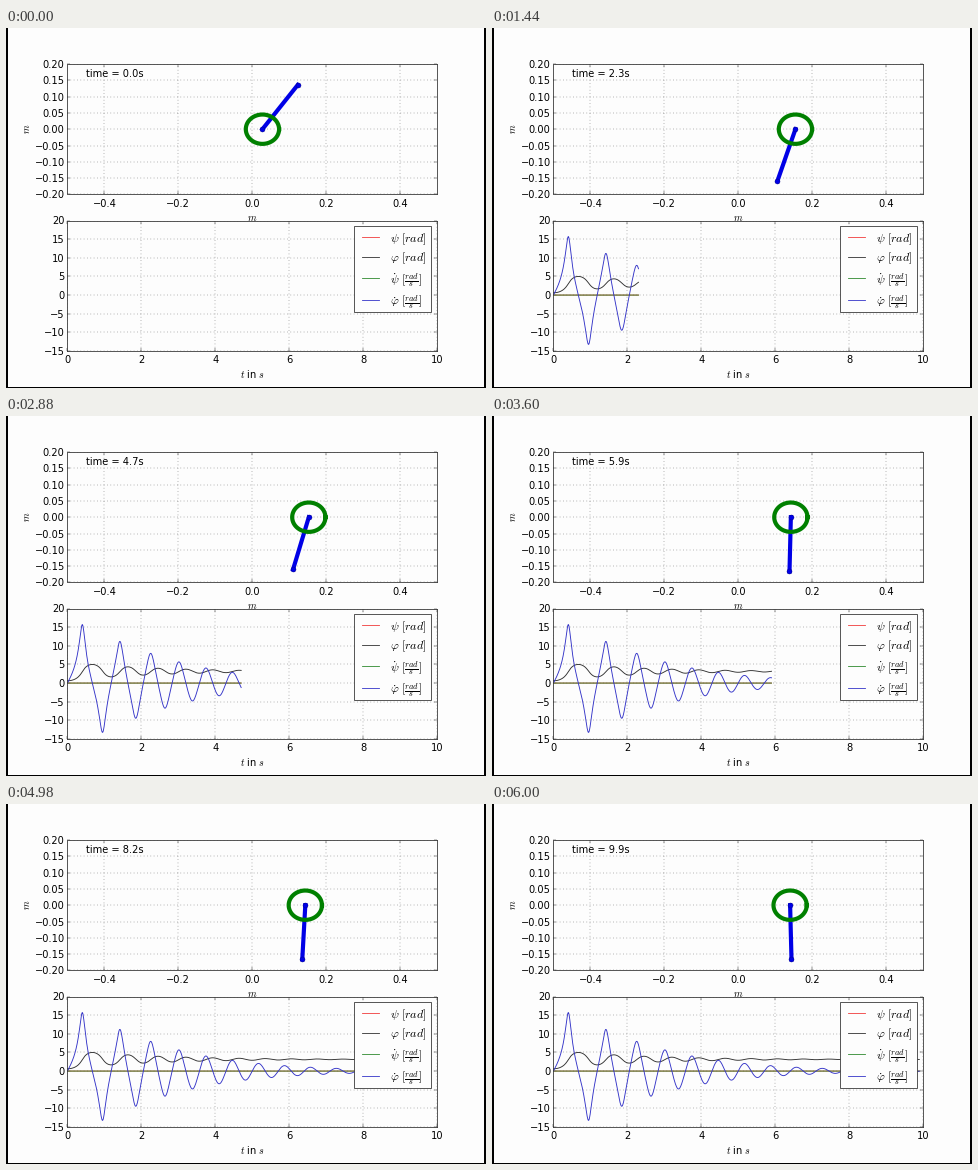
Animation, 480 px wide and 360 px high, one loop 6060 ms. Source, as a matplotlib script:

```python
import numpy as np
import matplotlib.pyplot as plt
from matplotlib.animation import FuncAnimation
from matplotlib.patches import Rectangle

W, H, DPI = 480, 360, 100
PT = 72 / DPI              # points per pixel
PAPER = "#fdfdfd"
INK = "#383838"            # thin strokes look softer than solid black
FRAMES, INTERVAL = 101, 60
RADIUS, ROD = 0.045, 0.166  # wheel radius and rod length in metres
DT, PER_FRAME = 0.01, 10

plt.rcParams.update({
    "font.family": "DejaVu Sans",
    "font.size": 9.9 * PT,
    "mathtext.fontset": "cm",
    "lines.scale_dashes": False,
    "axes.linewidth": 0.6,
    "axes.edgecolor": INK,
})


def rates(state):
    """Damped rod fixed to a rolling wheel; the angle is measured from upright."""
    phi, omega = state
    q, w, d = 0.426, 46.4, 0.56
    force = (w + q / 2 * omega**2) * np.sin(phi) - d * omega
    return np.array([omega, force / (1 + q * np.cos(phi))])


def simulate(steps):
    out = np.empty((steps + 1, 2))
    out[0] = 0.613, 0.0
    for i in range(steps):
        s = out[i]
        k1 = rates(s)
        k2 = rates(s + DT / 2 * k1)
        k3 = rates(s + DT / 2 * k2)
        k4 = rates(s + DT * k3)
        out[i + 1] = s + DT / 6 * (k1 + 2 * k2 + 2 * k3 + k4)
    return out


def make_axes(top, bottom, xlim, ylim, xticks, yticks):
    left, right = 61.5, 431
    ax = fig.add_axes([left / W, 1 - bottom / H,
                       (right - left) / W, (bottom - top) / H])
    ax.set_facecolor(PAPER)
    ax.set(xlim=xlim, ylim=ylim, xticks=xticks, yticks=yticks)
    ax.tick_params(direction="in", length=2.4, width=0.3,
                   top=True, right=True)
    ax.tick_params(axis="x", pad=3.0)
    ax.tick_params(axis="y", pad=2.0)
    ax.grid(True, color=INK, lw=0.3, ls=(0, (0.6, 1.8)))
    ax.set_axisbelow(True)
    return ax


phi, omega = simulate((FRAMES - 2) * PER_FRAME).T
time = np.arange(len(phi)) * DT
zero = np.zeros_like(time)

fig = plt.figure(figsize=(W / DPI, H / DPI), dpi=DPI, facecolor=PAPER)
scene = make_axes(36, 166.4, (-0.5, 0.5), (-0.2, 0.2),
                  np.linspace(-0.4, 0.4, 5), np.linspace(-0.2, 0.2, 9))
graph = make_axes(192.5, 323, (0, 10), (-15, 20),
                  range(0, 11, 2), range(-15, 21, 5))

# Overlay in pixel coordinates for edges, labels and the legend
stage = fig.add_axes([0, 0, 1, 1], zorder=5)
stage.set(xlim=(0, W), ylim=(H, 0))
stage.axis("off")
for x, y, w, h in [(0, 0, 2, H), (W - 2, 0, 2, H), (0, H - 1, W, 1)]:
    stage.add_patch(Rectangle((x, y), w, h, color="black", lw=0))

scene.text(0.5, 1 - (190 - 36) / 130.4, "$m$", transform=scene.transAxes,
           ha="center", va="center")
stage.text(21.4, 101, "$m$", rotation=90, ha="center", va="center")
stage.text(246.2, 349.5, "$t$ in $s$", ha="center", va="baseline")

stage.add_patch(Rectangle((347.5, 198), 77.5, 86, fc=PAPER, ec=INK, lw=0.6))
series = [
    (zero, "#f03c3c", r"$\psi\ [rad]$", 209),
    (phi, "#303030", r"$\varphi\ [rad]$", 228.7),
    (zero, "#2f8a2f", r"$\dot{\psi}\ [\frac{rad}{s}]$", 250),
    (omega, "#3434c8", r"$\dot{\varphi}\ [\frac{rad}{s}]$", 271.5),
]
curves = []
for data, color, label, y in series:
    stage.plot([356, 372.8], [y, y], color=color, lw=0.6)
    stage.text(384.5, y - 0.5, label, size=11.9 * PT, va="center_baseline")
    curves.append(graph.plot([], [], color=color, lw=0.65, snap=False)[0])

rod, = scene.plot([], [], color="#0000e6", lw=3, marker="o", ms=3.6,
                  mec="#000080", mew=0.3)
ring, = scene.plot([], [], color=(0, 0.5, 0), lw=3)
clock = scene.text(0.05, 0.9, "", transform=scene.transAxes)
turn = np.linspace(0, 2 * np.pi, 80)


def draw(frame):
    i = max(frame - 1, 0) * PER_FRAME
    angle = phi[i]
    x = RADIUS * angle
    ring.set_data(x + RADIUS * np.cos(turn), RADIUS * np.sin(turn))
    rod.set_data([x, x + ROD * np.sin(angle)], [0, ROD * np.cos(angle)])
    clock.set_text(f"time = {time[i]:.1f}s")
    for curve, (data, *_) in zip(curves, series):
        curve.set_data(time[:i + 1], data[:i + 1])
    return [ring, rod, clock, *curves]


anim = FuncAnimation(fig, draw, frames=FRAMES, interval=INTERVAL,
                     repeat=True, repeat_delay=0, blit=False)
plt.show()
```
